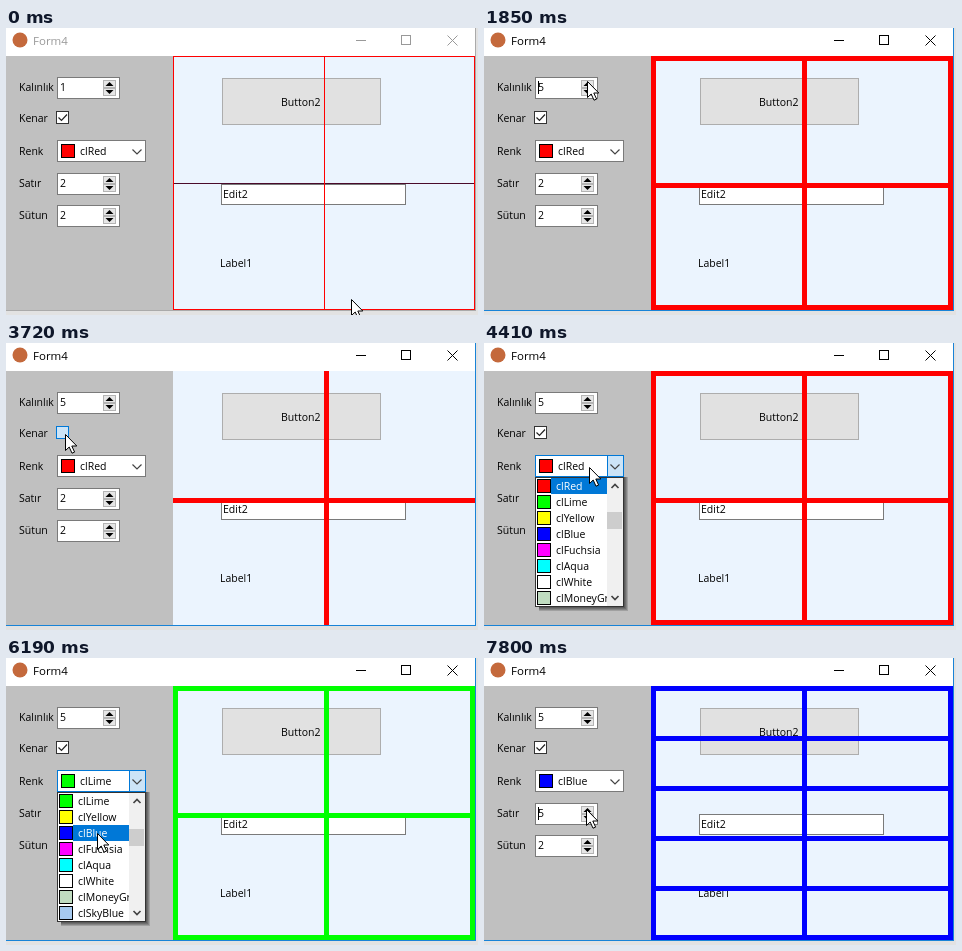
Animation, 472 px wide and 287 px high, one loop 8 s. Source, as an HTML page:

```html
<!DOCTYPE html>
<html lang="tr">
<head>
<meta charset="utf-8">
<style>
  html, body { margin: 0; width: 100%; height: 100%; overflow: hidden; background: #e2e2e2; }
  svg { display: block; width: 472px; height: 287px; }
  rect { shape-rendering: crispEdges; }
  text { font: 10.5px "Open Sans", "Noto Sans", sans-serif; white-space: pre; }
</style>
</head>
<body>
<svg id="stage" viewBox="0 0 472 287"></svg>
<script>
const LOOP = 8000;
const stage = document.getElementById('stage');
const AREA = { left: 167, top: 28, right: 469, bottom: 282 };
const BLUE = '#0078d7';

const COLORS = [
  ['clRed', '#ff0000'], ['clLime', '#00ff00'], ['clYellow', '#ffff00'],
  ['clBlue', '#0000ff'], ['clFuchsia', '#ff00ff'], ['clAqua', '#00ffff'],
  ['clWhite', '#ffffff'], ['clMoneyGr', '#c0dcc0'], ['clSkyBlue', '#a6caf0']
];

// Pointer moves: start, end, number of steps, destination
const START = [345, 271];
const MOVES = [
  [70, 460, 6, 103, 53],
  [2400, 2780, 6, 47, 84], [2860, 3010, 3, 59, 91],
  [4020, 4170, 3, 105, 124], [4480, 4480, 1, 105, 127],
  [4650, 4730, 2, 95, 157],
  [5110, 5340, 4, 91, 122], [5640, 5720, 2, 91, 137],
  [5800, 5960, 3, 91, 174], [6190, 6190, 1, 91, 175],
  [6650, 6950, 5, 105, 155], [7110, 7110, 1, 102, 151]
];
// Drop-downs: click, fully open, closed, first listed colour
const DROPS = [[4170, 4400, 4960, 0], [5490, 5710, 6490, 1]];

const between = (t, a, b) => t >= a && t < b;
const countPast = (t, times) => times.filter(at => t >= at).length;

function pointerAt(t) {
  let [x, y] = START;
  for (const [from, to, steps, nx, ny] of MOVES) {
    if (t < from) break;
    const k = t >= to ? 1
      : (Math.floor((t - from) / (to - from) * (steps - 1)) + 1) / steps;
    const eased = k * k * (3 - 2 * k);
    x += (nx - x) * eased;
    y += (ny - y) * eased;
  }
  return [Math.round(x), Math.round(y)];
}

const fill = (x, y, w, h, color) =>
  `<rect x="${x}" y="${y}" width="${w}" height="${h}" fill="${color}"/>`;
const box = (x, y, w, h, color, edge) =>
  fill(x, y, w, h, edge) + fill(x + 1, y + 1, w - 2, h - 2, color);
const label = (x, y, s, color = '#000') =>
  `<text x="${x}" y="${y}" fill="${color}">${s}</text>`;
const stroke = (d, color, width = 1) =>
  `<path d="${d}" fill="none" stroke="${color}" stroke-width="${width}"/>`;
const shape = (d, color) => `<path d="${d}" fill="${color}"/>`;

function windowFrame(active) {
  const ink = active ? '#000' : '#999';
  const edge = active ? '#1883d7' : '#aaa';
  return fill(0, 0, 470, 283, edge) + fill(0, 0, 469, 28, '#fff')
    + '<circle cx="14" cy="12" r="7.5" fill="#c4693c"/>'
    + `<text x="27" y="17" style="font-size:11.5px" fill="${ink}">Form4</text>`
    + fill(350, 12, 10, 1, ink)
    + box(395, 7, 10, 10, '#fff', ink)
    + stroke('M441.5 7.5l10 10m0-10l-10 10', ink)
    + fill(0, 28, 167, 254, '#c0c0c0')
    + fill(167, 28, 302, 254, '#ebf4fe');
}

function spin(y, value, focused, [px, py]) {
  const hot = between(px, 51, 114) && between(py, y, y + 22);
  const overDown = hot && px >= 97 && py >= y + 10;
  return box(51, y, 63, 22, '#fff', hot && !focused ? '#222' : '#7a7a7a')
    + label(54, y + 14, value)
    + (focused ? fill(54, y + 4, 1, 13, '#000') : '')
    + box(97, y + 3, 13, 8, '#e6e6e6', '#b4b4b4')
    + box(97, y + 11, 13, 8, overDown ? '#e5f1fb' : '#e6e6e6', overDown ? BLUE : '#b4b4b4')
    + shape(`M99.5 ${y + 9}h8l-4-4z`, '#000')
    + shape(`M99.5 ${y + 13}h8l-4 4z`, '#000');
}

function checkbox(checked, hot, pressed) {
  return box(50, 83, 13, 13, pressed ? '#cce4f7' : '#fff', hot ? BLUE : '#333')
    + (checked ? stroke('M52.5 89.5l3 3l5.5-6', hot ? BLUE : '#222', 1.2) : '');
}

function combo([name, color], highlighted, open) {
  return box(51, 112, 89, 22, '#fff', open ? BLUE : '#7a7a7a')
    + (open ? box(123, 112, 17, 22, '#cce4f7', BLUE) : '')
    + (highlighted ? fill(54, 115, 67, 16, BLUE)
        + '<rect x="70.5" y="115.5" width="50" height="15" fill="none" stroke="#ffb060" stroke-dasharray="1 1"/>' : '')
    + box(55, 116, 14, 14, color, '#000')
    + label(74, 127, name, highlighted ? '#fff' : '#000')
    + stroke('M126.5 121.5l4.5 4.5l4.5-4.5', '#444', 1.2);
}

function dropDown(first, progress, pointerY) {
  const height = Math.round(130 * progress);
  const hover = Math.max(0, Math.floor((pointerY - 135) / 16));
  const rows = COLORS.slice(first, first + 8).map(([name, color], i) => {
    const y = 135 + 16 * i;
    const lit = i === hover;
    return (lit ? fill(67, y, 56, 16, BLUE) : '')
      + box(53, y + 1, 14, 14, color, '#000')
      + label(72, y + 12, name, lit ? '#fff' : '#000');
  }).join('');
  const shadow = [4, 3, 2, 1].map(d =>
    `<rect x="${55}" y="134" width="${85 + d}" height="${height + d}" opacity=".17"/>`).join('');
  return shadow
    + `<clipPath id="reveal"><rect x="51" y="134" width="89" height="${height}"/></clipPath>`
    + `<g clip-path="url(#reveal)"><g transform="translate(0 ${height - 130})">`
    + box(51, 134, 89, 130, '#fff', '#333') + rows
    + fill(123, 135, 16, 128, '#f0f0f0')
    + fill(123, 169 + 2 * first, 15, 17, '#cdcdcd')
    + stroke('M127.5 145l3.5-3.5l3.5 3.5M127.5 253l3.5 3.5l3.5-3.5', '#444', 1.7)
    + '</g></g>';
}

function grid(thick, color, rows, bordered) {
  const { left, top, right, bottom } = AREA;
  const w = right - left, h = bottom - top;
  const rowStep = Math.floor(h / rows);
  let out = '';
  for (let i = 1; i < rows; i++)
    out += fill(left, top + i * rowStep, w, thick, thick === 1 ? '#4a0a2a' : color);
  out += fill(left + w / 2, top, thick, h, color);
  if (bordered) {
    out += fill(left, top, w, thick, color) + fill(left, bottom - thick, w, thick, color)
      + fill(left, top, thick, h, color) + fill(right - thick, top, thick, h, color);
  }
  return out;
}

function pointer([x, y]) {
  return `<path transform="translate(${x + .5} ${y + .5})" fill="#fff" stroke="#000"
    d="M0 0v16l3.7-3.5l2.8 6.2l2.6-1.1l-2.8-6.1h5z"/>`;
}

function render(t) {
  const mouse = pointerAt(t);
  const thick = 1 + countPast(t, [690, 920, 1240, 1770]);
  const rows = 2 + countPast(t, [7260, 7490, 7720]);
  const checked = !between(t, 3170, 3800);
  const overCheck = between(mouse[0], 50, 63) && between(mouse[1], 83, 96);
  const color = COLORS[t < 4960 ? 0 : t < 6490 ? 1 : 3];
  const drop = DROPS.find(([from, , to]) => between(t, from, to));
  const progress = drop ? Math.min(1, (t - drop[0]) / (drop[1] - drop[0])) : 0;
  const comboFocused = between(t, 4170, 7190);

  stage.innerHTML = windowFrame(t >= 610)
    + ['Kalınlık', 'Kenar', 'Renk', 'Satır', 'Sütun']
        .map((s, i) => label(13, [63, 94, 127, 159, 191][i], s)).join('')
    + spin(49, thick, between(t, 610, 3240), mouse)
    + checkbox(checked, overCheck, between(t, 3090, 3170) || between(t, 3720, 3800))
    + combo(color, comboFocused && progress < 1, progress === 1)
    + spin(145, rows, t >= 7190, mouse)
    + spin(177, 2, false, mouse)
    + box(216, 50, 159, 47, '#e1e1e1', '#adadad') + label(275, 78, 'Button2')
    + box(215, 156, 185, 21, '#fff', '#7a7a7a') + label(217, 170, 'Edit2')
    + label(214, 239, 'Label1')
    + grid(thick, color[1], rows, checked)
    + (drop ? dropDown(drop[3], progress, mouse[1]) : '')
    + pointer(mouse);
}

const startTime = performance.now();
function tick() {
  render((performance.now() - startTime) % LOOP);
  requestAnimationFrame(tick);
}
render(0);
requestAnimationFrame(tick);
</script>
</body>
</html>
```
